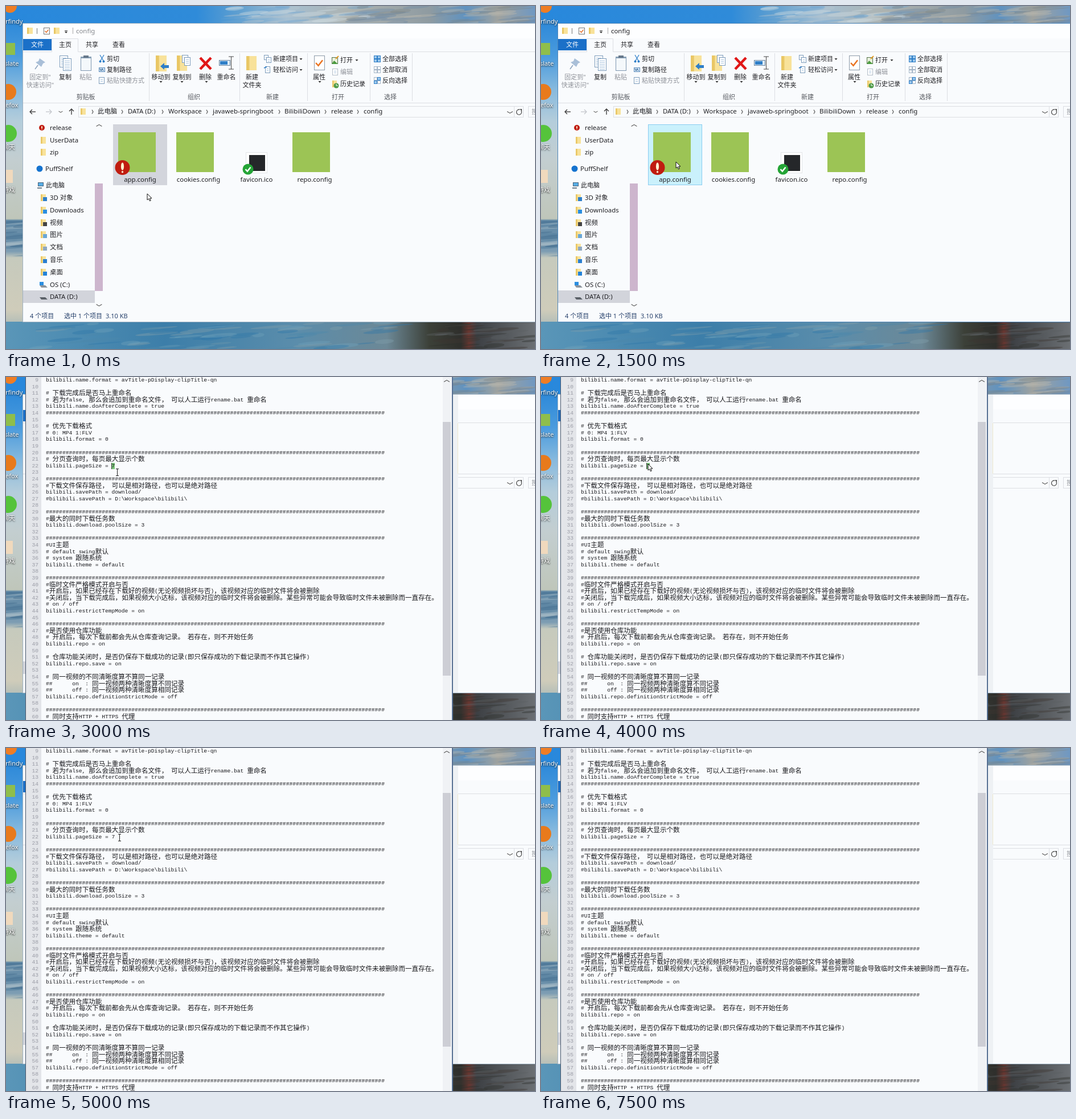
Recreate the animation shown at these times as an HTML page with a canvas. Size 929 by 603 pixels, loop 8000 ms.

```html
<!DOCTYPE html>
<html lang="zh-CN">
<head>
<meta charset="utf-8">
<style>
html, body { margin: 0; width: 100%; height: 100%; overflow: hidden; }
canvas { display: block; }
</style>
</head>
<body>
<canvas id="stage" width="929" height="603"></canvas>
<script>
const c = document.getElementById('stage').getContext('2d');
const UI = '"Noto Sans", "Noto Sans CJK SC", sans-serif';
const MONO = '"Liberation Mono", "Noto Sans CJK SC", monospace';
const INK = '#202024', GREY = '#8f9299', BLUE = '#2f7fc8', LINE = '#dcdee3', PAPER = '#f9fbfd';

// --- basic helpers ---
function box(x, y, w, h, fill, stroke) {
  if (fill) { c.fillStyle = fill; c.fillRect(x, y, w, h); }
  if (stroke) { c.strokeStyle = stroke; c.lineWidth = 1; c.strokeRect(x + .5, y + .5, w - 1, h - 1); }
}
function path(pts, color, width = 1) {
  c.beginPath();
  for (let i = 0; i < pts.length; i += 2) c.lineTo(pts[i], pts[i + 1]);
  c.strokeStyle = color; c.lineWidth = width; c.stroke();
}
function poly(pts, fill) {
  c.beginPath();
  for (let i = 0; i < pts.length; i += 2) c.lineTo(pts[i], pts[i + 1]);
  c.closePath(); c.fillStyle = fill; c.fill();
}
function dot(x, y, r, fill) {
  c.beginPath(); c.arc(x, y, r, 0, 7); c.fillStyle = fill; c.fill();
}
function text(s, x, y, color = INK, size = 11.4, align = 'left') {
  c.font = size + 'px ' + UI; c.textAlign = align; c.fillStyle = color;
  c.fillText(s, x, Math.round(y) + 4);
}
const label = (s, x, y, color = INK) => text(s, x, y, color, 11);
const mid = (s, x, y, color = INK) => text(s, x, y, color, 11, 'center');
function gradient(x, y, w, h, stops) {
  const g = c.createLinearGradient(x, y, w > h ? x + w : x, w > h ? y : y + h);
  stops.forEach(([p, col]) => g.addColorStop(p, col));
  box(x, y, w, h, g);
}

// --- small icons ---
const down = (x, y, col = '#333') => poly([x - 2.5, y - 1, x + 2.5, y - 1, x, y + 2], col);
const tick = (x, y, s, col, w) => path([x - s, y, x - s * .25, y + s * .8, x + s, y - s * .8], col, w);
function angle(x, y, dx, dy, col = '#555') {
  path([x - dx - dy * 3.5, y - dy - dx * 3.5, x + dx, y + dy, x - dx + dy * 3.5, y - dy + dx * 3.5], col, 1.2);
}
function folder(x, y, w, h) {
  y = Math.round(y);
  box(x, y, w, h, '#f8e29a');
  box(x, y, w * .3, h, '#e9c765');
}
function page(x, y, w, h, col = '#7d9cbb') {
  box(x, y, w, h, '#fff', col);
  for (let i = y + 4; i < y + h - 2; i += 3) box(x + 3, i, w - 6, 1, '#a9c4de');
}
function badge(x, y, r) {
  dot(x, y, r, '#c01c10');
  c.beginPath(); c.ellipse(x, y - r * .15, r * .2, r * .52, 0, 0, 7); c.fillStyle = '#fff3d0'; c.fill();
  dot(x, y + r * .6, r * .13, '#fff3d0');
}
function arrowLine(x, y, dx, dy, col) {
  path([x - dx * 5, y - dy * 5, x + dx * 5, y + dy * 5], col, 1.3);
  path([x + dx - dy * 4, y + dy - dx * 4, x + dx * 5, y + dy * 5, x + dx + dy * 4, y + dy + dx * 4], col, 1.3);
}

// --- desktop ---
let seed;
const rnd = () => (seed = seed * 16807 % 2147483647) / 2147483647;
function daubs(x, y, w, h, n, cols) {
  c.save(); c.beginPath(); c.rect(0, y, x < 30 ? 30 : 929, h); c.clip(); c.globalAlpha = .4;
  for (let i = 0; i < n; i++) {
    c.beginPath();
    c.ellipse(x + rnd() * w, y + rnd() * h, 10 + rnd() * 28, 1 + rnd() * 3, -.08, 0, 7);
    c.fillStyle = cols[i % cols.length]; c.fill();
  }
  c.restore();
}
function desktop() {
  seed = 77;
  gradient(0, 0, 929, 31, [[0, '#2888dc'], [.36, '#2f8bd9'], [.44, '#5f9fd0'], [.53, '#a5bfd2'],
    [.65, '#adb3b1'], [.8, '#8f9ba1'], [.87, '#5f92c0'], [.93, '#9fa29f'], [1, '#6f98c2']]);
  daubs(400, 0, 230, 31, 36, ['#cfdbe2', '#6aa3d2', '#b9c6cd']);
  daubs(610, 0, 319, 31, 45, ['#b9b7ad', '#6f8ba5', '#7b8588']);
  gradient(0, 31, 30, 572, [[0, '#2f8ad9'], [.1, '#4a9bdd'], [.2, '#86b9de'], [.3, '#b4cddb'], [.42, '#c3ced0'],
    [.6, '#bfc6ba'], [.605, '#5d86a4'], [.7, '#7d9db3'], [.72, '#c6cabd'], [.88, '#cfccba'], [1, '#7fa2b3']]);
  daubs(0, 378, 30, 62, 16, ['#3d668a', '#a9bcc6', '#4c7898']);
  gradient(0, 555, 929, 48, [[0, '#5a96b8'], [.3, '#3c7ea9'], [.55, '#5b8dab'], [.72, '#6c8896'],
    [.8, '#3c4038'], [.86, '#2f2f2c'], [.875, '#693630'], [.89, '#3d4044'], [1, '#6b6f73']]);
  daubs(50, 555, 650, 48, 70, ['#2f76a8', '#6fa0b9', '#4c87ab', '#7f9fab']);
  daubs(760, 555, 169, 48, 30, ['#2e302c', '#5a5f62', '#3c3530']);

  dot(7, 0, 12, '#ef7d24');
  box(0, 65, 16, 21, '#8fbe4b');
  dot(4, 151, 14, '#e87a1c');
  dot(4, 224, 15, '#55c33b');
  box(0, 288, 12, 23, '#f0d9bd');
  c.shadowColor = '#000'; c.shadowBlur = 3; c.shadowOffsetY = 1;
  [['rfindy', -1, 27], ['slate', -2, 101], ['efox', -1, 174], ['聊天', -6, 248], ['游戏', -6, 323]]
    .forEach(([s, x, y]) => text(s, x, y, '#fff', 11));
  c.shadowColor = 'transparent';
}

// --- file window ---
function ribbonIcons() {
  poly([59, 92, 69, 99, 65, 101, 62, 107, 52, 99, 57, 97], '#a9bfd8');
  path([56, 104, 51, 111], '#8aa2bd', 1.5);
  page(94, 87, 15, 21); page(100, 92, 15, 22);
  box(131, 89, 19, 25, '#f4f8fb', '#7e97b0'); box(131, 89, 19, 3, '#8aa2b8'); box(136, 87, 9, 4, '#66788a');
  path([165, 86, 171, 96], BLUE, 1.3); path([172, 86, 166, 96], BLUE, 1.3);
  dot(165.5, 97.5, 2, BLUE); dot(171.5, 97.5, 2, BLUE);
  box(163, 108, 11, 8, '#cfe2f3', '#5c8cba'); path([165, 110, 167, 114, 169, 110, 171, 114], '#24588c');
  page(163, 125, 10, 12);
  folder(263, 87, 19, 28); poly([271, 106, 278, 100, 278, 104, 286, 104, 286, 109, 278, 109, 278, 112], BLUE);
  folder(300, 87, 18, 27); page(309, 86, 11, 14); page(313, 90, 11, 15);
  path([341, 91, 360, 111], '#e01616', 4.5); path([360, 91, 341, 111], '#e01616', 4.5);
  box(374, 95, 20, 10, '#dcebf8', '#67829c'); box(376, 97, 13, 6, BLUE);
  path([391, 89, 400, 89], '#444'); path([395.5, 89, 395.5, 111], '#444'); path([391, 111, 400, 111], '#444');
  folder(422, 88, 18, 25);
  page(453, 86, 8, 9); page(457, 90, 9, 10);
  page(455, 106, 9, 12); path([453, 109, 458, 107], BLUE, 1.5);
  box(541, 87, 19, 26, '#fff', '#8c9aa8'); tick(550, 100, 6, '#ea7422', 2.5);
  box(572, 90, 11, 12, '#e9f1dd', '#53714a'); poly([572, 102, 576, 96, 583, 102], '#4b9a3f'); path([579, 93, 584, 88], '#e29a27', 2);
  page(573, 110, 10, 12, '#b3bec9');
  folder(573, 131, 8, 12); dot(580, 140, 4.5, '#4f9a49'); path([580, 137, 580, 140, 583, 140], '#fff');
  for (let k = 0; k < 3; k++) for (let i = 0; i < 4; i++) {
    const on = k === 0 || k === 2 && i % 3 !== 0;
    box(646 + i % 2 * 6, 87 + k * 19 + (i >> 1) * 6, 6, 6, on ? '#9cc8ec' : '#fff', on ? BLUE : '#a2b4c6');
  }
}
function ribbon() {
  box(30, 58, 50, 20, '#1b70c8');
  path([30, 80.5, 80.5, 80.5, 80.5, 57.5, 126.5, 57.5, 126.5, 80.5, 929, 80.5], LINE);
  mid('文件', 55, 68, '#fff'); mid('主页', 104, 68); mid('共享', 151, 68); mid('查看', 198, 68);
  [251, 410, 529, 639, 713].forEach(x => box(x, 83, 1, 84, LINE));
  box(30, 170, 899, 1, LINE);
  [['剪贴板', 140], ['组织', 330], ['新建', 468], ['打开', 583], ['选择', 675]]
    .forEach(([s, x]) => mid(s, x, 160, '#55585e'));
  mid('固定到"', 60, 125, GREY); mid('快速访问"', 60, 139, GREY); mid('粘贴', 140, 125, GREY);
  [['复制', 104], ['移动到', 272], ['复制到', 309], ['删除', 350], ['重命名', 387], ['新建', 432], ['属性', 550]]
    .forEach(([s, x]) => mid(s, x, 125));
  mid('文件夹', 432, 139);
  [[272, 133], [309, 133], [352, 133], [551, 133], [518, 93], [518, 112], [616, 95]].forEach(p => down(...p));
  label('剪切', 177, 93); label('复制路径', 177, 112); label('粘贴快捷方式', 177, 131, GREY);
  label('新建项目', 469, 93); label('轻松访问', 469, 112);
  label('打开', 587, 95); label('编辑', 587, 116, GREY); label('历史记录', 587, 137);
  label('全部选择', 661, 93); label('全部取消', 661, 112); label('反向选择', 661, 131);
  ribbonIcons();
}
function addressBar() {
  arrowLine(47, 186, -1, 0, '#333'); arrowLine(75, 186, 1, 0, '#c3c6cb');
  angle(96, 186, 0, 1, '#777'); arrowLine(115, 186, 0, -1, '#333');
  box(127, 176, 782, 20, null, LINE); box(892, 176, 1, 20, LINE);
  folder(131, 180, 9, 11);
  [152, 204, 275, 353, 480, 561, 618].forEach(x => angle(x, 186, 1, 0));
  [['此电脑', 161], ['DATA (D:)', 214], ['Workspace', 285], ['javaweb-springboot', 363],
    ['BilibiliDown', 489], ['release', 571], ['config', 628]].forEach(([s, x]) => text(s, x, 185));
  angle(885, 187, 0, 1.4);
  c.beginPath(); c.arc(901, 186.5, 4.5, -.6, 5); c.strokeStyle = '#555'; c.lineWidth = 1.3; c.stroke();
  poly([902, 181, 906, 181, 906, 185], '#555');
  box(917, 176, 20, 20, null, LINE); label('搜', 923, 186, GREY);
}
function navPane() {
  box(30, 500, 126, 22, '#d2d4db');
  ['release', 'UserData', 'zip'].forEach((s, i) => {
    const y = 214 + i * 21.7;
    i ? folder(61, y - 6, 9, 12) : badge(63, y, 5);
    text(s, 77, y);
  });
  dot(59, 286, 5.5, '#1573cf'); text('PuffShelf', 69, 286);
  box(56, 310, 10, 7, '#58aee6', '#49637a'); box(55, 319, 8, 2, '#6c7c8a'); text('此电脑', 70, 315, INK, 11);
  const marks = [BLUE, '#2a8ee0', '#444', '#6aa7d6', '#8fa8c0', '#2b7fd0', '#2382d8'];
  ['3D 对象', 'Downloads', '视频', '图片', '文档', '音乐', '桌面'].forEach((s, i) => {
    const y = Math.round(337 + i * 21.8);
    folder(61, y - 6, 9, 12); box(65, y - 1, 7, 7, marks[i]); text(s, 77, y);
  });
  [['OS (C:)', 490], ['DATA (D:)', 511]].forEach(([s, y], i) => {
    poly([59, y + 1, 69, y + 1, 73, y + 5, 62, y + 5], i ? '#5b6168' : '#8c949c');
    if (!i) box(59, y - 5, 7, 6, '#2a8ee0');
    text(s, 77, y);
  });
  angle(163.5, 210, 0, -1.4); angle(163.5, 526, 0, 1.4);
  box(156, 312, 14, 189, '#cdb5cd');
}
function files(hot) {
  box(188, 208, 95, 107, hot ? '#caf1fc' : '#d3d5dc', hot ? '#8bcdf0' : null);
  [197, 299, 503].forEach(x => box(x, 222, 66, 70, '#9cc455'));
  badge(204.5, 284, 13);
  box(421, 257, 38, 37, '#fff', '#e3e5e8');
  box(427, 262, 28, 28, '#25272a');
  dot(425, 287, 9.5, '#24a436'); tick(425, 287, 4.5, '#fff', 2.4);
  [['app.config', 235.5], ['cookies.config', 338], ['favicon.ico', 440], ['repo.config', 542]]
    .forEach(([s, x]) => text(s, x, 305, INK, 11.4, 'center'));
}
function explorer(hot, active) {
  box(29, 30, 901, 526, PAPER, active ? '#4f86b8' : '#9fb2c2');
  box(30, 31, 899, 26, '#fdfeff');
  folder(37, 38, 10, 11); box(54, 39, 1, 10, '#777');
  box(66, 38, 11, 12, '#fff', '#777'); tick(71.5, 44, 3, '#e06a26', 1.5);
  folder(84, 38, 10, 11); box(103, 43, 5, 1, '#333'); down(105.5, 46); box(117, 38, 1, 11, '#aaa');
  text('config', 123, 44, active ? INK : '#85888d');
  ribbon(); addressBar(); navPane(); files(hot);
  const note = '#26406b';
  label('4 个项目', 42, 545, note); label('选中 1 个项目', 102, 545, note); label('3.10 KB', 175, 545, note);
}

// --- text editor; "%" stands for a full rule of hashes ---
const LINES = String.raw`bilibili.name.format = avTitle-pDisplay-clipTitle-qn

# 下载完成后是否马上重命名
# 若为false, 那么会追加到重命名文件， 可以人工运行rename.bat 重命名
bilibili.name.doAfterComplete = true
%

# 优先下载格式
# 0: MP4 1:FLV
bilibili.format = 0

%
# 分页查询时，每页最大显示个数
bilibili.pageSize = 7

%
#下载文件保存路径， 可以是相对路径，也可以是绝对路径
bilibili.savePath = download/
#bilibili.savePath = D:\Workspace\bilibili\

%
#最大的同时下载任务数
bilibili.download.poolSize = 3

%
#UI主题
# default swing默认
# system 跟随系统
bilibili.theme = default

%
#临时文件严格模式开启与否
#开启后，如果已经存在下载好的视频(无论视频损坏与否)，该视频对应的临时文件将会被删除
#关闭后，当下载完成后，如果视频大小达标，该视频对应的临时文件将会被删除。某些异常可能会导致临时文件未被删除而一直存在。
# on / off
bilibili.restrictTempMode = on

%
#是否使用仓库功能
# 开启后，每次下载前都会先从仓库查询记录。 若存在，则不开始任务
bilibili.repo = on

# 仓库功能关闭时，是否仍保存下载成功的记录(即只保存成功的下载记录而不作其它操作)
bilibili.repo.save = on

# 同一视频的不同清晰度算不算同一记录
##      on  : 同一视频两种清晰度算不同记录
##      off : 同一视频两种清晰度算相同记录
bilibili.repo.definitionStrictMode = off

%
# 同时支持HTTP + HTTPS 代理`.replace(/%/g, '#'.repeat(103)).split('\n');
const COL = 5.79;

function code(s, x, y) {
  for (const run of s.match(/[\x00-\x7f]+|[^\x00-\x7f]+/g) || []) {
    const wide = run.charCodeAt(0) > 127;
    c.font = (wide ? COL * 2 : COL / .6) + 'px ' + MONO;
    c.fillText(run, x, Math.round(y) + (wide ? 4 : 3));
    x += run.length * COL * (wide ? 2 : 1);
  }
}
function editor(selected) {
  box(785, 31, 9, 524, '#eef1f4'); box(793, 81, 1, 89, '#eee9cf');
  box(34, 0, 751, 603, PAPER);
  box(35, 0, 27, 603, '#e3e5e9');
  box(34, 0, 1, 603, '#45546a'); box(783, 0, 2, 603, '#566f92');
  box(767, 0, 15, 603, '#f0f2f5'); box(767, 79, 14, 446, '#cdced5');
  angle(774, 7, 0, -1.4);
  if (selected) { box(185, 151, 6, 11, '#7ecb7e'); box(185, 151, 1, 11, '#333'); }
  LINES.forEach((s, i) => {
    const y = 5 + i * 11.6;
    c.textAlign = 'right'; c.fillStyle = '#9a9ca6'; code(String(i + 9), 57, y);
    c.textAlign = 'left'; c.fillStyle = '#18181c'; code(s, 70, y);
  });
}

// --- pointers ---
function arrow(x, y) {
  const p = [0, 0, 0, 11, 2.6, 8.8, 4.4, 12.8, 6.2, 12, 4.5, 8.1, 8, 8].map((v, i) => v + (i % 2 ? y : x));
  poly(p, '#fff');
  path([...p, p[0], p[1]], '#111');
}
function beam(x, y) {
  path([x - 2.5, y - 6, x + 2.5, y - 6], '#222');
  path([x, y - 6, x, y + 6], '#222');
  path([x - 2.5, y + 6, x + 2.5, y + 6], '#222');
}
// one pointer position per half second
const POINTER = [[248, 330], [248, 330], [237, 274], [237, 274], [238.5, 275.5], [209.5, 207.5], [195.5, 167.5], [191.5, 160.5],
  [188, 153], [203.5, 165.5], [199.5, 157.5], [438.5, 129.5], [656.5, 12.5], [658.5, 2.5], [635.5, 43.5], null];

function draw(step) {
  desktop();
  explorer(step >= 2, step === 3);
  if (step >= 4) editor(step < 10);
  const p = POINTER[step];
  if (p) (step < 4 || step === 8 ? arrow : beam)(...p);
}

let shown = -1;
function frame() {
  // half a display frame early, so a change never shows late
  const step = Math.floor((performance.now() + 8) % 8000 / 500);
  if (step !== shown) draw(shown = step);
  requestAnimationFrame(frame);
}
frame();
</script>
</body>
</html>
```
